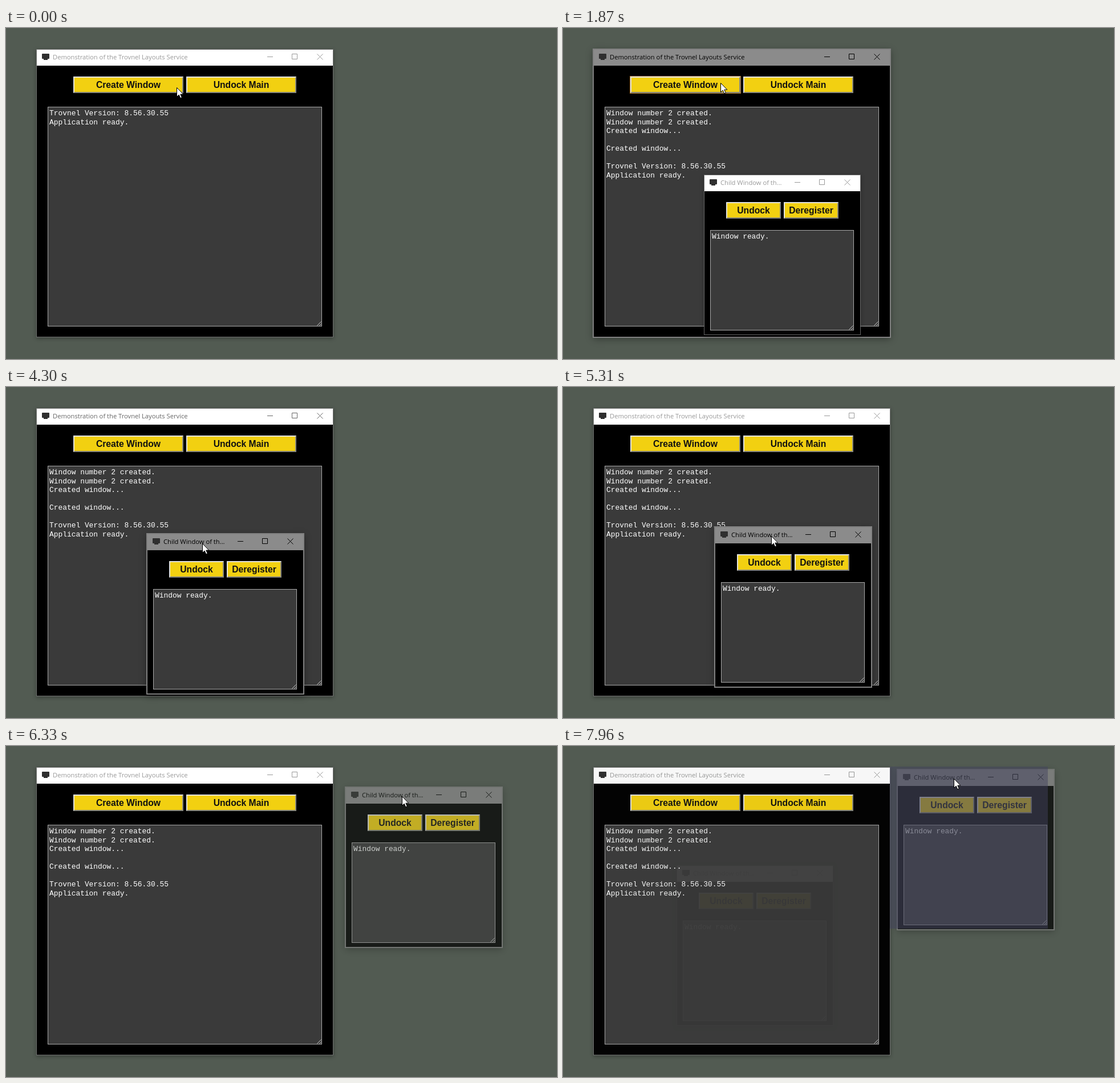
These frames come from a looping animation (966x580 px, 8 s). An HTML page:

```html
<!DOCTYPE html>
<html lang="en">
<head>
<meta charset="utf-8">
<title>Window docking</title>
<style>
  html, body { margin: 0; width: 100%; height: 100%; overflow: hidden; background: #525b52; }
  body > *, .window > *, .grip { position: absolute; box-sizing: border-box; }
  .window {
    left: 0; top: 0; background: #000 padding-box;
    border: 1px solid rgba(125, 125, 125, .8);
    box-shadow: 0 2px 7px rgba(0, 0, 0, .32);
    --bar: #fff; --ink: #999;
  }
  .window.fading { --ink: #666; }
  .window.active {
    --bar: #8b8b8b; --ink: #000;
    border-color: #808080; outline: 1px solid #808080;
    box-shadow: 0 3px 12px rgba(0, 0, 0, .38);
  }
  .bar { inset: 0 0 auto; height: 28px; background: var(--bar); }
  .title { left: 28px; top: 0; font: 11.2px/26px "Open Sans", sans-serif; color: var(--ink); white-space: pre; }
  .icon { left: 9px; top: 7px; fill: #2f2f2f; }
  .controls { right: 16px; top: 7px; fill: none; stroke: var(--ink); }
  .buttons { inset: 47px 0 auto; display: flex; justify-content: center; gap: 5px; }
  .button {
    box-sizing: border-box; height: 29px; border: 2px solid; border-color: #e2e2dc #85857c #85857c #e2e2dc;
    background: #f2d011; color: #111; text-align: center;
    font: bold 15.7px/25px "Liberation Sans", Arial, sans-serif;
  }
  .window.active .focused { box-shadow: 0 0 0 1px #a8752c; }
  .log {
    border: 1px solid #a9a9a9; background: #3a3a3a; color: #fff; padding: 3px 2px;
    font: 12.9px/15.5px "Liberation Mono", "Courier New", monospace; white-space: pre;
  }
  .grip { right: 0; bottom: 0; stroke: #ccc; fill: none; }
  #preview { left: 573px; top: 36px; width: 277px; height: 284px; background: rgba(65, 66, 94, .48); }
  #cursor { left: 0; top: 0; overflow: visible; }
</style>
</head>
<body>
<script>
const LOOP = 8000;
const STEP = 204; // the picture advances in steps of this many ms

// Moments, counted in steps
const ACTIVATE = 4, FIRST_CLICK = 5, SECOND_CLICK = 6, CHILD_OPENS = 8, CHILD_READY = 9;
const REACH_START = 10, REACH_END = 16, CHILD_FOCUS = 21;
const DRAG_START = 26, DRAG_END = 31, PREVIEW = 38, LAST = 39;

const progress = (s, from, to) => Math.min(1, Math.max(0, (s - from) / (to - from)));
const ease = u => u * u * (3 - 2 * u);
const mix = (a, b, u) => a + (b - a) * u;
const bend = (a, b, c, u) => mix(mix(a, b, u), mix(b, c, u), u);

function makeWindow({ width, height, title, buttons, buttonWidth, logInset }) {
  const el = document.createElement("div");
  el.className = "window";
  el.style.cssText = `width:${width}px;height:${height}px`;
  el.innerHTML = `
    <div class="bar"></div>
    <svg class="icon" width="13" height="11"><rect width="13" height="9" rx="1"/><rect x="3" y="9" width="7" height="2"/></svg>
    <div class="title">${title}</div>
    <svg class="controls" width="100" height="12">
      <path d="M1 5.5h10M44.5 .5h9v9h-9zM88.5 .5l10 10m0-10l-10 10"/>
    </svg>
    <div class="buttons">${buttons.map(label =>
      `<div class="button" style="width:${buttonWidth}px">${label}</div>`).join("")}</div>
    <div class="log" style="inset:${logInset}"><span>Window ready.</span><svg
      class="grip" width="8" height="8"><path d="M.5 7.5l7-7M4.5 7.5l3-3"/></svg></div>`;
  document.body.append(el);
  return el;
}

const makeChild = () => makeWindow({
  width: 275, height: 281, title: "Child Window of th...",
  buttons: ["Undock", "Deregister"], buttonWidth: 96, logInset: "96px 11px 7px 10px"
});

const place = (el, x, y) => el.style.transform = `translate(${Math.round(x)}px, ${Math.round(y)}px)`;
const show = (el, visible) => el.style.visibility = visible ? "visible" : "hidden";

const coveredChild = makeChild();
place(coveredChild, 199, 209);
const main = makeWindow({
  width: 521, height: 505, title: "Demonstration of the Trovnel Layouts Service",
  buttons: ["Create Window", "Undock Main"], buttonWidth: 193, logInset: "100px 19px 18px"
});
place(main, 53, 37);
main.querySelector(".button").classList.add("focused");
const child = makeChild();
const mainLog = main.querySelector(".log span");
const childLog = child.querySelector(".log span");

document.body.insertAdjacentHTML("beforeend", `
  <div id="preview"></div>
  <svg id="cursor" width="14" height="20">
    <path d="M.5 .5v16l3.7-3.4 2.5 5.7 2.6-1.1-2.5-5.6h5z" fill="#fff" stroke="#000"/>
  </svg>`);
const preview = document.getElementById("preview");
const cursor = document.getElementById("cursor");

function childPosition(s) {
  if (s < DRAG_START) return [247, 257];
  if (s < DRAG_END) {
    const u = ease(progress(s, DRAG_START, DRAG_END));
    return [mix(266, 595, u), mix(245, 72, u)];
  }
  // Drifts out to the right, curls back and levels off beside the main window
  const u = progress(s, DRAG_END, LAST);
  return [
    mix(595, 586, u) + 20.5 * Math.sin(Math.PI * Math.sqrt(u)),
    40.5 + 31.5 * Math.exp((DRAG_END - s) / 2)
  ];
}

function cursorPosition(s, [x, y]) {
  if (s >= DRAG_START) return [x + 99, y + 16];
  if (s < REACH_START) {
    const u = progress(s, 0, 2);
    return [mix(299, 276, u), mix(104, 96, u)];
  }
  const u = ease(progress(s, REACH_START, REACH_END));
  return [bend(276, 460, 344, u), bend(96, 200, 274, u)];
}

function logText(s) {
  const numbered = (s >= CHILD_OPENS) + (s >= CHILD_READY);
  const created = (s >= FIRST_CLICK) + (s >= SECOND_CLICK);
  return "Window number 2 created.\n".repeat(numbered)
    + "Created window...\n\n".repeat(created)
    + "Trovnel Version: 8.56.30.55\nApplication ready.";
}

function draw(t) {
  const s = Math.floor(t / STEP);
  const position = childPosition(s);
  place(child, ...position);
  place(cursor, ...cursorPosition(s, position));

  show(child, s >= CHILD_OPENS);
  child.classList.toggle("active", s >= CHILD_FOCUS);
  child.style.opacity = mix(1, .7, progress(s, DRAG_START + 2, DRAG_END - 1));
  childLog.textContent = s >= CHILD_READY ? "Window ready." : "";

  main.classList.toggle("active", s >= ACTIVATE && s < CHILD_FOCUS);
  main.classList.toggle("fading", s >= CHILD_FOCUS && s < DRAG_START);
  main.style.opacity = mix(1, .955, progress(s, PREVIEW - 1, LAST));
  mainLog.textContent = logText(s);

  show(preview, s >= PREVIEW);
}

function frame() {
  draw(performance.now() % LOOP);
  requestAnimationFrame(frame);
}
frame();
</script>
</body>
</html>
```
